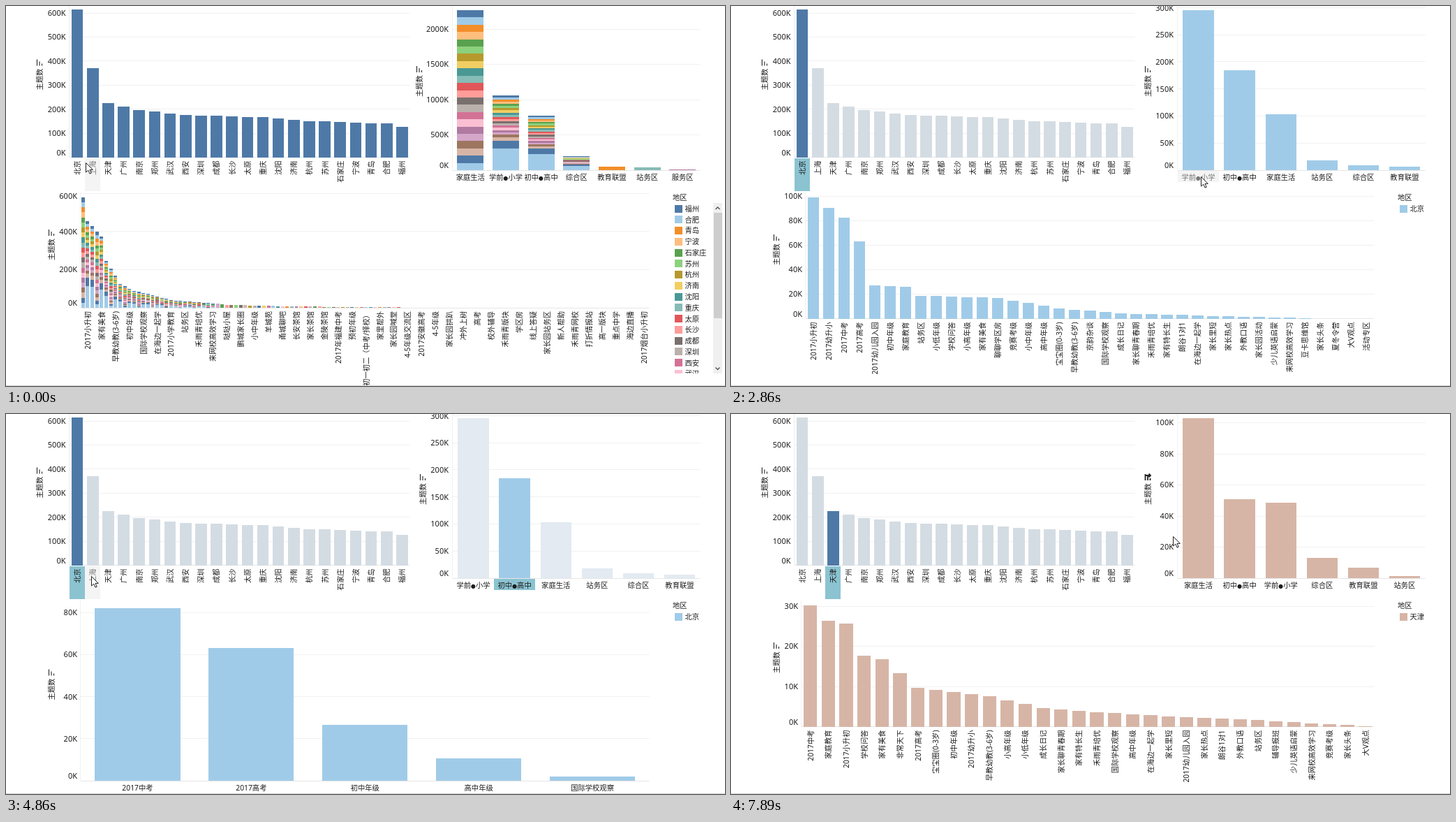
Recreate the animation shown at these times as an HTML page. Size 1030 by 544 pixels, loop 8 s.

```html
<!DOCTYPE html>
<html lang="zh-CN">
<head>
<meta charset="utf-8">
<title>Dashboard</title>
<style>
html, body { margin: 0; width: 100%; height: 100%; overflow: hidden; background: #fff; }
svg { display: block; }
text { font: 10.3px "Noto Sans", "Noto Sans CJK SC", "Noto Sans CJK JP", sans-serif; fill: #1c1c1c; }
text.tick { font-size: 11px; }
.dot { font: 8px "DejaVu Sans", sans-serif; }
</style>
</head>
<body>
<svg id="stage" width="1030" height="544" viewBox="0 0 1030 544"></svg>
<script>
const LOOP = 8000;
const BLUE = '#4e79a7', SELECT = '#8bc3d1', HOVER = '#f4f4f4';
const PALETTE = ('#4e79a7 #a0cbe8 #f28e2b #ffbe7d #59a14f #8cd17d #b6992d #f1ce63 #499894 #86bcb6 ' +
  '#e15759 #ff9d9a #79706e #bab0ac #d37295 #fabfd2 #b07aa1 #d4a6c8 #9d7660 #d7b5a6').split(' ');
const CITIES = ('北京 上海 天津 广州 南京 郑州 武汉 西安 深圳 成都 长沙 太原 重庆 沈阳 济南 杭州 苏州 ' +
  '石家庄 宁波 青岛 合肥 福州').split(' ');
const cityColor = i => PALETTE[(CITIES.length - 1 - i) % PALETTE.length];

// Drawing helpers; rectangles snap to whole pixels
function rect(x, y, w, h, fill) {
  const l = Math.round(x), t = Math.round(y);
  const r = Math.round(x + w), b = Math.round(y + h);
  return `<rect x="${l}" y="${t}" width="${r - l}" height="${b - t}" fill="${fill}"/>`;
}
const line = (x1, y1, x2, y2, color) => `<path d="M${x1} ${y1}L${x2} ${y2}" stroke="${color}"/>`;
const crisp = y => Math.round(y - .5) + .5;

function text(s, x, y, { anchor = 'start', turn = 0, cls = '', fill = '' } = {}) {
  const body = s.replace('●', '<tspan class="dot">●</tspan>');
  return `<text class="${cls}" text-anchor="${anchor}" dy="3.9" ${fill && `style="fill:${fill}"`}
    transform="translate(${x} ${y}) rotate(${turn})">${body}</text>`;
}

// Title read upwards, followed by a descending-sort icon
function axisTitle(x, y, active) {
  const arrow = active ? 'M42-4v8m-2.5-2.5l2.5 2.5l2.5-2.5' : '';
  return text('主题数', x, y, { turn: -90 }) +
    `<path transform="translate(${x} ${y}) rotate(-90)" d="M35-3.5h9M35 0h6M35 3.5h3${arrow}"
      fill="none" stroke="#222" stroke-width="${active ? 1.8 : 1.1}"/>`;
}

// Every city in one bar; skew favours the first cities, and a short bar shows one city only
function stack(i, x, w, base, top, skew) {
  if (base - top < 6) return rect(x, top, w, base - top, PALETTE[(i + 2) * 7 % 20]);
  const weights = CITIES.map((_, k) => 1 + skew * Math.exp(-1.3 * k));
  const unit = (base - top) / weights.reduce((a, b) => a + b);
  let y = base;
  return weights.map((v, k) => rect(x, y -= v * unit, w, Math.max(v * unit, 1), cityColor(k))).join('');
}

// n values on straight segments through [index, value] points
function curve(n, ...points) {
  return Array.from({ length: n }, (_, i) => {
    const j = Math.max(1, points.findIndex(p => p[0] >= i));
    const [a, u] = points[j - 1], [b, v] = points[j];
    return u + (v - u) * (i - a) / (b - a);
  });
}

function chart(c) {
  const { left, right, base, top, values, unit, step, tickX, flat, first = 0, every = 1 } = c;
  const cell = c.cell || (right - left) / values.length;
  let out = line(left - .5, Math.max(top, 0), left - .5, base, '#f0f0f0');
  for (let k = 0; base - k * step >= top; k++) {
    const y = base - k * step;
    out += line(left, crisp(y), right, crisp(y), k ? '#f1f1f1' : '#e6e6e6') +
      text(k * unit + 'K', tickX, k ? Math.max(y, top + 5) : base - 6.5, { anchor: 'end', cls: 'tick' });
  }
  const mark = (i, color) =>
    i === undefined ? '' : rect(left + i * cell, base + 1, cell, flat ? 16 : 47, color);
  out += mark(c.hover, HOVER) + mark(c.sel, SELECT);
  values.forEach((v, i) => {
    const x = left + (i + .125) * cell, w = cell * .75, y = base - v * step / unit;
    out += c.skew ? stack(i, x, w, base, y, c.skew(i)) : rect(x, y, w, base - y, c.color(i));
  });
  c.labels.split(' ').forEach((s, j) => {
    const x = left + (first + j * every + .5) * cell;
    const fill = j === c.hover ? '#777' : '';
    out += flat ? text(s, x, base + 10, { anchor: 'middle', fill })
      : text(s, x, base + 5, { anchor: 'end', turn: -90, fill });
  });
  return out + axisTitle(...c.title, c.sorting);
}

function legend(city) {
  const row = (i, y) => rect(957.5, y - 5.5, 11, 11, cityColor(i)) + text(CITIES[i], 972.5, y);
  const out = text('地区', 955, 274);
  if (city !== undefined) return out + row(city, 290);
  const rows = CITIES.map((_, k) => row(CITIES.length - 1 - k, 290 + k * 15.76)).join('');
  return out + `<svg width="1012" height="526">${rows}</svg>` +
    rect(1013, 282, 13, 244, '#f0f0f0') + rect(1014, 296, 12, 151, '#cdcdcd') +
    '<path d="M1016.5 291l3-3 3 3M1016.5 517.5l3 3 3-3" fill="none" stroke="#555" stroke-width="1.4"/>';
}

const cursor = (x, y) =>
  `<path transform="translate(${x} ${y})" d="M.5.5V14L3.8 11.2 6 16.2 8.2 15.2 6 10.4H10.3Z" fill="#fff" stroke="#222"/>`;

// Chart data, in thousands
const cityChart = (sel, hover) => chart({
  left: 91, right: 578.5, base: 216.5, top: -2, step: 34.4, unit: 100, tickX: 85.5, title: [48, 120.5],
  values: curve(22, [0, 615], [1, 371], [2, 224], [4, 196], [7, 176], [12, 166], [15, 151], [20, 140], [21, 126]),
  labels: CITIES.join(' '), sel, hover,
  color: i => sel === undefined || i === sel ? BLUE : '#d4dce3'
});

const AREA = { left: 640, right: 994.5, base: 235, top: -2, tickX: 634, flat: true, title: [597, 130] };
const areas = {
  all: {
    ...AREA, title: [592, 130], unit: 500, step: 50.5, values: [2267, 1064, 772, 198, 45, 35, 8],
    labels: '家庭生活 学前●小学 初中●高中 综合区 教育联盟 站务区 服务区',
    skew: i => i === 0 ? 0 : 9
  },
  beijing: {
    ...AREA, unit: 50, step: 38.8, values: [295, 184, 103, 18, 9, 7],
    labels: '学前●小学 初中●高中 家庭生活 站务区 综合区 教育联盟'
  },
  shanghai: {
    ...AREA, unit: 20, step: 33.7, values: [136, 103, 102, 18.4, 7.7, 5.6],
    labels: '初中●高中 家庭生活 学前●小学 综合区 教育联盟 站务区'
  },
  tianjin: {
    ...AREA, unit: 20, step: 44.5, values: [103, 51, 48.5, 13, 6.7, 1.3],
    labels: '家庭生活 初中●高中 学前●小学 综合区 教育联盟 站务区'
  }
};

const TOPIC = { left: 107, right: 921.5, base: 447.5, top: 267, tickX: 102, title: [65, 371] };
const topics = {
  all: {
    ...TOPIC, base: 432, title: [65, 364], unit: 200, step: 54.6, cell: 6.645, first: 1, every: 3,
    values: curve(122, [0, 579], [1, 454], [4, 374], [5, 245], [7, 168], [8, 124], [11, 88], [15, 66],
      [19, 40], [25, 29], [31, 16], [45, 7], [70, 1.5], [121, 0]),
    skew: i => i % 3 ? 7 : 0,
    labels: '2017小升初 家有美食 早教幼教(3-6岁) 初中年级 国际学校观察 在海边一起学 2017小学教育 站务区 ' +
      '禾雨青培优 来网校高效学习 哒哒小屋 鹏城家长圈 小中年级 羊城苑 甬城聊吧 长安茶馆 家长茶馆 金陵茶馆 ' +
      '2017年福建中考 预初年级 初一初二（中考/择校） 家里帮外 家长园喊堂 4-5年级交流区 2017安徽高考 4-5年级 ' +
      '家长园拱趴 冲外上树 高考 校外辅导 禾雨青版块 学区房 线上答疑 家长园站务区 新人帮助 禾雨青网校 ' +
      '打折情报站 高一版块 重点中学 海边直播 2017烟台小升初'
  },
  beijing: {
    ...TOPIC, unit: 20, step: 35.1,
    values: curve(37, [0, 98.6], [2, 82.3], [3, 63.2], [4, 27], [6, 26.2], [7, 18.8], [12, 16.8], [16, 8.3],
      [20, 4.3], [28, 1.5], [33, 0], [36, 0]),
    labels: '2017小升初 2017幼升小 2017中考 2017高考 2017幼儿园入园 初中年级 家庭教育 站务区 小低年级 学校问答 ' +
      '小高年级 家有美食 聊聊学区房 竞赛考级 小中年级 高中年级 宝宝圈(0-3岁) 早教幼教(3-6岁) 京韵杂谈 ' +
      '国际学校观察 成长日记 家长聊青春期 禾雨青培优 家有特长生 朗谷1对1 在海边一起学 家长里短 家长热点 ' +
      '外教口语 家长园活动 少儿英语启蒙 来网校高效学习 豆卡思维馆 家长头条 夏冬令营 大V观点 活动专区'
  },
  middle: {
    ...TOPIC, base: 525, title: [65, 409.5], unit: 20, step: 60.2, flat: true,
    values: [82, 63, 26.7, 10.5, 2],
    labels: '2017中考 2017高考 初中年级 高中年级 国际学校观察'
  },
  shanghai: {
    ...TOPIC, left: 101, tickX: 96, unit: 20, step: 51.6,
    values: curve(37, [0, 67], [1, 48.8], [2, 41.5], [3, 40.5], [5, 17.8], [7, 16.5], [8, 9.7], [11, 6],
      [17, 4.8], [23, 2.1], [29, .7], [36, .1]),
    labels: '2017中考 2017高考 2017小学教育 2017学前教育 家庭教育 学校问答 家有美食 哒哒小屋 小低年级 ' +
      '宝宝圈(0-3岁) 早教幼教(3-6岁) 高中年级 预初年级 初中年级 禾雨青培优 2017幼儿园入园 站务区 国际学校观察 ' +
      '成长日记 四年级 家长聊青春期 家有特长生 在海边一起学 家长里短 家长热点 外教口语 朗谷1对1 课外生活 ' +
      '少儿英语启蒙 来网校高效学习 学区房 老乔几何 活动摄影 新人帮助 禾雨青网校 家长头条 大V观点'
  },
  tianjin: {
    ...TOPIC, left: 101, tickX: 96, unit: 10, step: 57.5,
    values: curve(32, [0, 30.2], [1, 26.3], [2, 25.7], [3, 17.7], [4, 16.8], [6, 9.7], [10, 7.5], [13, 4.6],
      [18, 3], [25, 1.6], [31, .1]),
    labels: '2017中考 家庭教育 2017小升初 学校问答 家有美食 非常天下 2017高考 宝宝圈(0-3岁) 初中年级 2017幼升小 ' +
      '早教幼教(3-6岁) 小高年级 小低年级 成长日记 家长聊青春期 家有特长生 禾雨青培优 国际学校观察 高中年级 ' +
      '在海边一起学 家长里短 2017幼儿园入园 家长热点 朗谷1对1 外教口语 站务区 辅导报班 少儿英语启蒙 ' +
      '来网校高效学习 竞赛考级 家长头条 大V观点'
  }
};

// Each scene holds until the next one starts
const scenes = [
  { at: 0, area: 'all', topic: 'all', hover: 1, mouse: [114, 224] },
  { at: 1000, city: 0, area: 'beijing', topic: 'beijing', mouse: [98, 233] },
  { at: 1850, city: 0, area: 'beijing', topic: 'beijing', hover: 2, mouse: [198, 232] },
  { at: 2860, city: 0, area: 'beijing', topic: 'beijing', areaHover: 0, mouse: [673, 244] },
  { at: 3870, city: 0, area: 'beijing', topic: 'middle', areaSel: 1, mouse: [736, 246] },
  { at: 4860, city: 0, area: 'beijing', topic: 'middle', areaSel: 1, hover: 1, mouse: [122, 232] },
  { at: 5870, city: 1, area: 'shanghai', topic: 'shanghai', mouse: [139, 229] },
  { at: 6860, city: 2, area: 'tianjin', topic: 'tianjin', mouse: [147, 229] },
  { at: 7890, city: 2, area: 'tianjin', topic: 'tianjin', sorting: true, mouse: [633, 175] }
];

function draw({ city, hover, area, topic, areaHover, areaSel, sorting, mouse }) {
  const color = () => cityColor(city);
  const areaColor = i => areaSel === undefined || i === areaSel ? cityColor(city) : '#e3eaf1';
  return cityChart(city, hover) +
    chart({ ...areas[area], color: areaColor, hover: areaHover, sel: areaSel, sorting }) +
    chart({ ...topics[topic], color }) +
    legend(city) + line(0, 543.5, 1030, 543.5, '#d2d2d2') + cursor(...mouse);
}

const stage = document.getElementById('stage');
let shown;
function tick() {
  const t = performance.now() % LOOP;
  const scene = scenes.findLast(s => s.at <= t);
  if (scene !== shown) stage.innerHTML = draw(shown = scene);
  requestAnimationFrame(tick);
}
tick();
</script>
</body>
</html>
```
